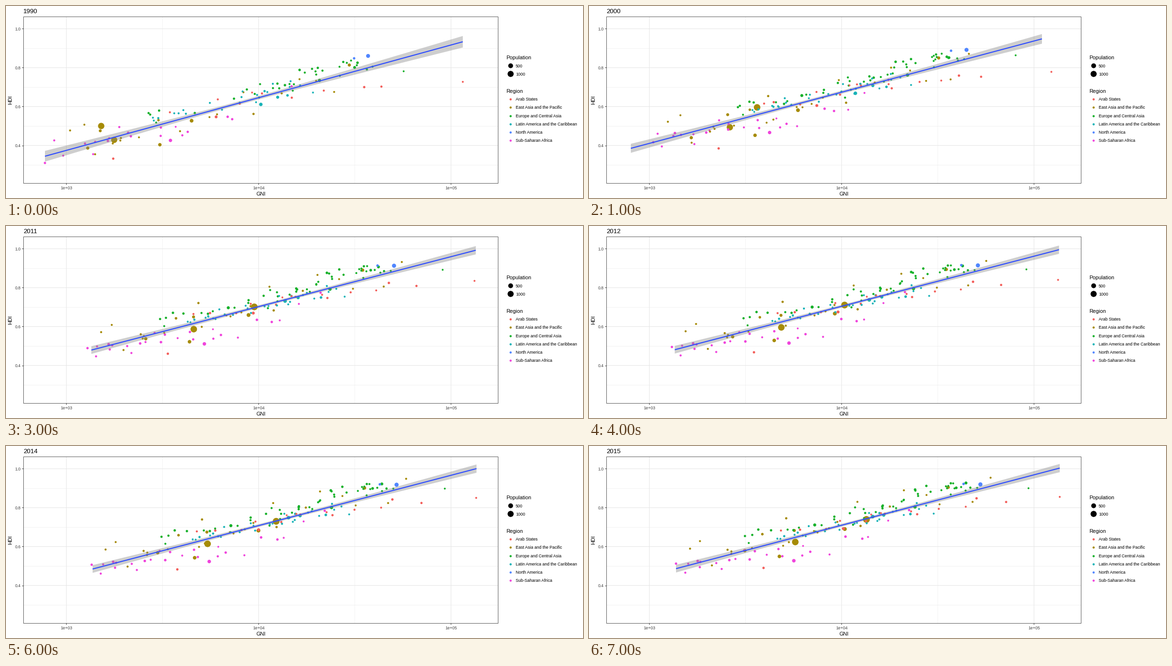
Write a matplotlib script that moves like this. It is 1200 by 400 pixels and loops after 8 s.

```python
import numpy as np
import matplotlib.pyplot as plt
from matplotlib.animation import FuncAnimation
from matplotlib.patches import Polygon, Rectangle

W, H, DPI = 1200, 400, 100
PT = 72 / DPI
YEARS = [1990, 2000] + list(range(2010, 2016))

plt.rcParams["font.family"] = "Liberation Sans"
rng = np.random.default_rng(4)

RED, GOLD, GREEN = "#F35E5A", "#A68B06", "#17B12B"
TEAL, BLUE, PINK = "#17B3B7", "#5086FF", "#F044DC"
LEGEND = [
    ("Arab States", RED),
    ("East Asia and the Pacific", GOLD),
    ("Europe and Central Asia", GREEN),
    ("Latin America and the Caribbean", TEAL),
    ("North America", BLUE),
    ("Sub-Saharan Africa", PINK),
]

# Large or outlying countries: colour, population, easing power,
# position in 1990, position in 2015.
LANDMARKS = [
    (GOLD, 1370, 1, (198, 250), (577, 153)),
    (GOLD, 1250, 1.2, (225, 279), (429, 200)),
    (GOLD, 250, 1.2, (386, 239), (532, 173)),
    (GOLD, 185, 1.2, (320, 289), (396, 230)),
    (GOLD, 140, 1.4, (170, 296), (324, 218)),
    (GOLD, 127, 1, (714, 123), (747, 86)),
    (GOLD, 90, 1, (196, 260), (427, 176)),
    (GREEN, 143, 1, (652, 155), (678, 127)),
    (GREEN, 81, 1, (725, 128), (784, 77)),
    (GREEN, 1, 0.4, (827, 136), (914, 88)),
    (TEAL, 195, 1, (530, 205), (590, 147)),
    (TEAL, 115, 0.7, (565, 190), (613, 144)),
    (BLUE, 315, 0.7, (753, 104), (814, 80)),
    (BLUE, 35, 0.7, (724, 109), (779, 79)),
    (PINK, 175, 1, (342, 280), (426, 239)),
    (PINK, 25, 0.7, (81, 327), (181, 245)),
    (RED, 85, 1, (437, 231), (529, 172)),
    (RED, 28, 1, (745, 169), (806, 109)),
    (RED, 25, 1.2, (223, 318), (363, 254)),
    (RED, 2, 1, (950, 158), (979, 106)),
]

# Smaller countries lie loosely along one path per region in 2015:
# colour, count, typical population, path, scatter, offset in 1990.
CROWDS = [
    (RED, 13, 9, [(390, 180), (560, 160), (640, 140), (860, 115)],
     (16, 9), (-75, 42)),
    (GOLD, 23, 9, [(217, 217), (310, 218), (450, 178), (600, 145), (850, 78)],
     (18, 13), (-60, 55)),
    (GREEN, 46, 14, [(300, 195), (520, 150), (640, 125), (735, 92), (800, 78)],
     (11, 7), (-42, 38)),
    (TEAL, 28, 9, [(380, 197), (490, 168), (605, 146), (722, 134)],
     (10, 8), (-88, 40)),
    (PINK, 24, 16, [(182, 250), (270, 249), (355, 228), (470, 225), (690, 140)],
     (14, 10), (-85, 40)),
]


def make_dots():
    """List (colour, population, first year, easing power, start, end)."""
    dots = [(c, pop, 1990, power, np.array(p), np.array(q))
            for c, pop, power, p, q in LANDMARKS]
    for color, n, pop, path, scatter, offset in CROWDS:
        stops = np.linspace(0, 1, len(path))
        px, py = zip(*path)
        for u in (np.arange(n) + 0.5) / n:
            end = np.array([np.interp(u, stops, px), np.interp(u, stops, py)])
            end += rng.normal(0, scatter)
            start = end + offset + rng.normal(0, (10, 5))
            first = 1990 if rng.random() < 0.72 else 2000
            size = pop * rng.lognormal(-0.3, 0.8)
            dots.append((color, size, first, 1, start, end))
    return sorted(dots, key=lambda d: -d[1])


def place(dot, year):
    _, _, _, power, start, end = dot
    return start + (end - start) * ((year - 1990) / 25) ** power


# Trend: x0, y0, x1, y1, half width at the centre, flare
TREND = {
    1990: (81, 313, 950, 74.5, 3.7, 0.0253),
    2000: (87, 296.5, 942, 68.5, 3.3, 0.0214),
    2010: (175, 260, 969, 53.5, 3, 0.0195),
    2011: (177.5, 258.5, 977, 50.5, 3, 0.0195),
    2015: (181, 255.5, 979, 46, 3, 0.0195),
}


def trend_at(year):
    return [np.interp(year, list(TREND), col) for col in zip(*TREND.values())]


def radius(pop):
    return 1.8 + 5.3 * np.sqrt(pop / 1376)


def area(r):
    return (2 * np.asarray(r) * PT) ** 2


fig = plt.figure(figsize=(W / DPI, H / DPI), dpi=DPI, facecolor="white")
ax = fig.add_axes([0, 0, 1, 1])
ax.set_xlim(0, W)
ax.set_ylim(H, 0)
ax.axis("off")

LEFT, TOP, RIGHT, BOTTOM = 36, 21.5, 1023, 369
GRID, TICK, LABEL = "#E6E6E6", "#333333", "#444444"


def line(xs, ys, color, px, z):
    ax.plot(xs, ys, color=color, lw=px * PT, zorder=z, solid_capstyle="butt")


def text(x, y, s, px=8.8, color="black", **kw):
    return ax.text(x, y, s, fontsize=px * PT, color=color, **kw)


for i in range(5):
    x = 125 + 200.1 * i
    line([x, x], [TOP, BOTTOM], GRID, 0.5 if i % 2 else 1.07, 1)
for i in range(8):
    y = 47.3 + 40.53 * i
    line([LEFT, RIGHT], [y, y], GRID, 0.5 if i % 2 else 1.07, 1)
ax.add_patch(Rectangle((LEFT, TOP), RIGHT - LEFT, BOTTOM - TOP, fill=False,
                       ec=TICK, lw=0.8 * PT, zorder=6))

for i, s in enumerate(("1e+03", "1e+04", "1e+05")):
    x = 125 + 400.2 * i
    line([x, x], [BOTTOM, BOTTOM + 3], TICK, 1, 6)
    text(x + 0.5, 382, s, color=LABEL, ha="center")
for i, s in enumerate(("1.0", "0.8", "0.6", "0.4")):
    y = 47.3 + 81.07 * i
    line([LEFT - 3, LEFT], [y, y], TICK, 1, 6)
    text(31, y + 3.5, s, color=LABEL, ha="right")
text(530, 395, "GNI", 11, ha="center")
text(14.2, 196, "HDI", 11, rotation=90, ha="right", va="center")

text(1040.5, 111, "Population", 11)
for y, pop in ((124.2, 500), (141.3, 1000)):
    ax.scatter([1049.3], [y], s=area(radius(pop)), c="black", lw=0)
    text(1060, y + 3.5, str(pop))
text(1040.5, 181, "Region", 11)
for i, (name, col) in enumerate(LEGEND):
    y = 194 + 17.25 * i
    ax.scatter([1049.3], [y], s=area(2.25), c=col, lw=0)
    text(1060, y + 3.2, name)

DOTS = make_dots()
title = text(36, 15, "1990", 13.2)
cloud = ax.scatter([], [], lw=0, zorder=3)
band = ax.add_patch(Polygon([(0, 0), (1, 0), (1, 1)], closed=True,
                            fc="#858585", alpha=0.4, lw=0, zorder=4))
fit, = ax.plot([], [], color="#2C4BFF", lw=2.13 * PT, zorder=5,
               solid_capstyle="butt")


def draw(i):
    year = YEARS[i]
    title.set_text(str(year))

    shown = [d for d in DOTS if d[2] <= year]
    growth = 1 + 0.007 * (year - 2015)
    cloud.set_offsets([place(d, year) for d in shown])
    cloud.set_sizes(area([radius(d[1] * growth) for d in shown]))
    cloud.set_facecolor([d[0] for d in shown])

    x0, y0, x1, y1, base, flare = trend_at(year)
    x = np.linspace(x0, x1, 80)
    y = np.linspace(y0, y1, 80)
    mid = x0 + 0.48 * (x1 - x0)
    half = np.hypot(base, flare * (x - mid))
    band.set_xy(np.column_stack([np.r_[x, x[::-1]],
                                 np.r_[y - half, (y + half)[::-1]]]))
    fit.set_data([x0, x1], [y0, y1])
    return title, cloud, band, fit


anim = FuncAnimation(fig, draw, frames=len(YEARS), interval=1000,
                     init_func=lambda: draw(0), repeat=True, repeat_delay=0)
plt.show()
```
